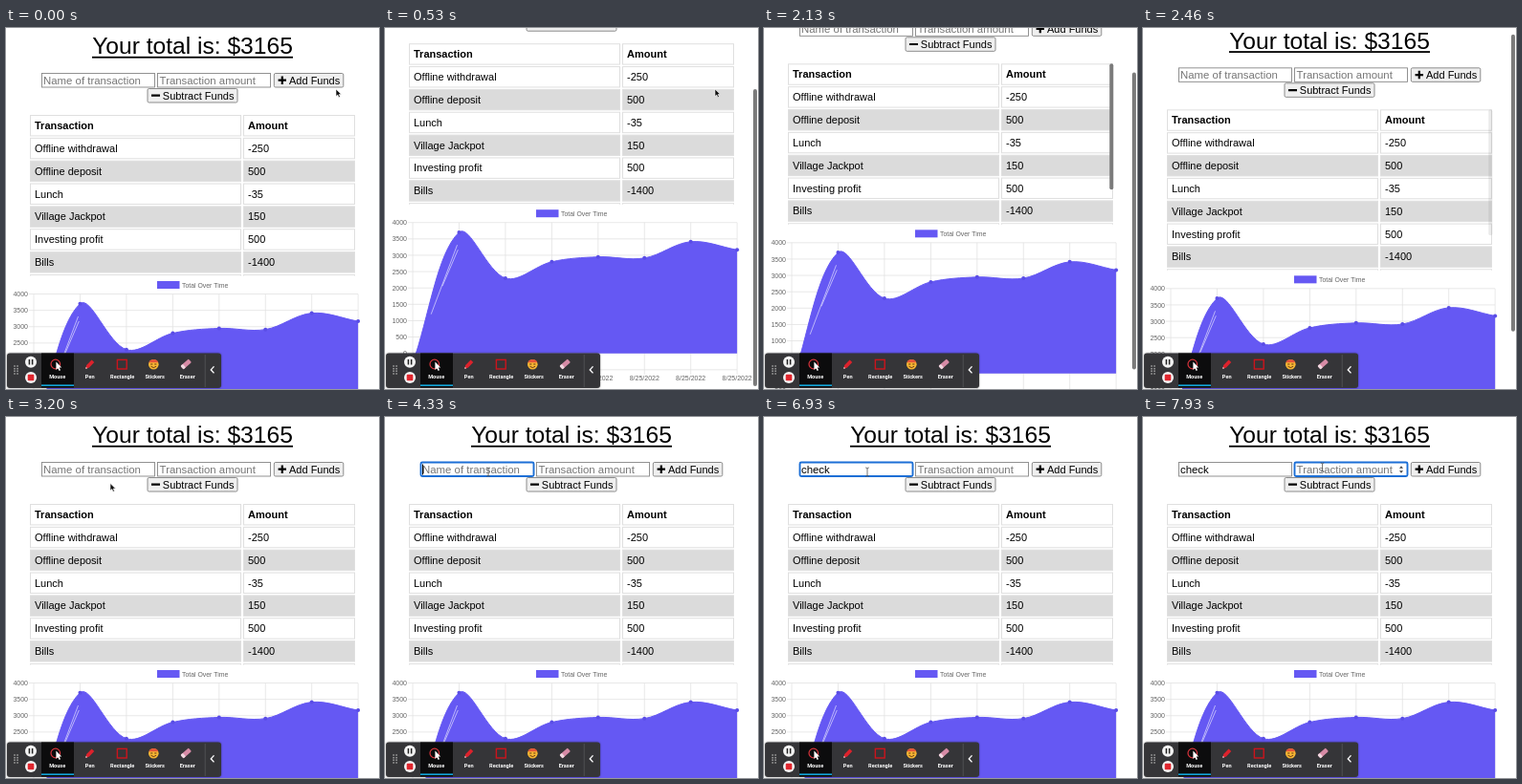
These frames come from a looping animation (390 by 378 pixels, 8 s). An HTML page:

```html
<!DOCTYPE html>
<html lang="en">
<head>
<meta charset="utf-8">
<title>Budget tracker</title>
<style>
html, body { margin: 0; width: 100%; height: 100%; overflow: hidden; background: #fff; }
svg { display: block; width: 390px; height: 378px; }
text { font-family: "Liberation Sans", Arial, sans-serif; white-space: pre; }
text.tool { font: 700 5.6px Roboto, sans-serif; fill: #fff; text-anchor: middle; }
.tick { font-size: 7px; fill: #666; }
.hint { fill: #757575; }
</style>
</head>
<body>
<svg id="stage" viewBox="0 0 390 378" xmlns="http://www.w3.org/2000/svg">
  <defs>
    <clipPath id="tableClip"><rect x="20" y="90.5" width="350" height="169"/></clipPath>
    <filter id="shadow" x="-10%" y="-30%" width="120%" height="160%">
      <feDropShadow dx="0" dy="0" stdDeviation="1.2" flood-color="#000" flood-opacity=".4"/>
    </filter>
  </defs>
  <rect width="390" height="378" fill="#fff"/>
  <g id="page">
    <text x="195" y="27.3" font-size="24.6" text-anchor="middle">Your total is: $3165</text>
    <rect x="90" y="29.8" width="210" height="1.8"/>
    <g font-size="11.4">
      <rect id="nameBox" x="37.5" y="47.5" width="118" height="14.5" fill="#fff"/>
      <text id="nameText" x="39" y="58.8"></text>
      <rect id="amountBox" x="158.5" y="47.5" width="118" height="14.5" fill="#fff"/>
      <text class="hint" x="160.6" y="58.8">Transaction amount</text>
      <path id="spinner" d="M268 53.8l2-2.6 2 2.6zM268 56.2l2 2.6 2-2.6z" fill="#444"/>
      <rect id="caret" y="49.5" width="1" height="11"/>
    </g>
    <g fill="#efefef" stroke="#808080" stroke-width=".9">
      <rect x="280.3" y="47.5" width="72.5" height="14.5" rx="1.5"/>
      <rect x="148" y="63.5" width="94" height="14.5" rx="1.5"/>
    </g>
    <path d="M284.6 54.7h8.4M288.8 50.5v8.4M152 70.7h9" stroke="#000" stroke-width="2.2"/>
    <text x="296" y="58.6" font-size="11">Add Funds</text>
    <text x="163.8" y="74.6" font-size="11">Subtract Funds</text>
    <g clip-path="url(#tableClip)"><g id="table"></g></g>
    <rect id="tableBar" x="361.3" width="4" height="132" rx="2" fill="#7b7b7b"/>
    <g id="chart"></g>
  </g>
  <rect id="pageBar" x="385" width="4" height="311" rx="2" fill="#7b7b7b"/>

  <g id="toolbar">
    <rect x="1" y="340.5" width="224" height="36.5" rx="3" fill="#343537" filter="url(#shadow)"/>
    <rect x="37" y="340.5" width="34" height="36" fill="#0c0c0d"/>
    <rect x="37" y="373.4" width="34" height="1.6" fill="#13a5d8"/>
    <path d="M9 353.2v10M12 353.2v10" stroke="#a5a5a5" stroke-width="1.5" stroke-dasharray="1.5 1.2"/>
    <circle cx="26" cy="349.8" r="6" fill="#f4f4f4"/>
    <path d="M24.4 347v5.6M27.6 347v5.6" stroke="#222" stroke-width="1.5"/>
    <circle cx="26" cy="366" r="6" fill="#f4f4f4"/>
    <rect x="22.7" y="362.7" width="6.6" height="6.6" rx="1" fill="#e0262e"/>
    <circle cx="51.8" cy="352" r="4.8" fill="none" stroke="#d8343c" stroke-width="1.2"/>
    <path d="M52.4 349.6v8.3l1.9-1.7 1.3 2.8 1.4-.7-1.3-2.7h2.5z" fill="#fff"/>
    <path d="M83.2 356.8l1-3.8 5.4-5.6 2.7 2.6-5.5 5.7z" fill="#dc222c"/>
    <path d="M83.2 356.8l.5-1.9 1.5 1.4z" fill="#fff"/>
    <rect x="116.4" y="347.4" width="9.8" height="9.6" fill="none" stroke="#cc141c" stroke-width="1.4"/>
    <circle cx="154.3" cy="352.3" r="5.3" fill="#f7b733"/>
    <path d="M149.4 350.2a5.3 5.3 0 0 1 9.8 0z" fill="#e5533a"/>
    <path d="M151.2 352h2.2M155.2 352h2.2M151.5 354.3q2.8 2.6 5.6 0" fill="none" stroke="#5a2c12" stroke-width=".9"/>
    <g transform="rotate(-42 188.2 352)">
      <rect x="182.6" y="349.6" width="11.2" height="4.8" rx="1" fill="#d78ba6"/>
      <rect x="182.6" y="349.6" width="3.2" height="4.8" rx="1" fill="#efd9e0"/>
    </g>
    <path d="M208.2 342v34" stroke="#57585a" stroke-width=".8"/>
    <path d="M217.5 354.4l-3.2 3.5 3.2 3.5" fill="none" stroke="#fff" stroke-width="1.4"/>
  </g>
  <path id="arrow" d="M0 0v7.6l1.8-1.6 1.2 2.7 1.4-.6-1.2-2.6h2.4z" fill="#111" stroke="#fff" stroke-width=".6"/>
  <path id="beam" d="M-1.8-4.5q1.8 0 1.8 1.3q0-1.3 1.8-1.3M0-3.4v7M-1.8 4.7q1.8 0 1.8-1.3q0 1.3 1.8 1.3" fill="none" stroke="#555" stroke-width=".8"/>
</svg>
<script>
const $ = id => document.getElementById(id);

function add(parent, tag, attrs, text) {
  const el = document.createElementNS("http://www.w3.org/2000/svg", tag);
  for (const k in attrs) el.setAttribute(k, attrs[k]);
  if (text !== undefined) el.textContent = text;
  parent.appendChild(el);
  return el;
}
function set(id, attrs) {
  for (const k in attrs) $(id).setAttribute(k, attrs[k]);
}

const entries = [
  ["Transaction", "Amount"], ["Offline withdrawal", -250], ["Offline deposit", 500],
  ["Lunch", -35], ["Village Jackpot", 150], ["Investing profit", 500],
  ["Bills", -1400], ["Paycheck", 4000], ["Groceries", -300]
];

function buildTable() {
  const g = $("table");
  entries.forEach((row, i) => {
    const y = 91 + i * 23.85;
    const fill = i && i % 2 === 0 ? "#dbdbdb" : "#fff";
    [[25, 221], [248, 117]].forEach(([x, w], c) => {
      add(g, "rect", { x: x + .5, y: y + .5, width: w - 1, height: 21.4, fill, stroke: "#dfdfdf" });
      add(g, "text", {
        x: x + 5, y: y + 15, "font-size": 11, "font-weight": i ? 400 : 700
      }, row[c]);
    });
  });
}

const px = i => 29 + i * 48.45;
const py = v => 415.5 - v * .03425;

// Smooth path through the points, handles scaled by neighbour distance
function spline(p, tension) {
  const handles = p.map((b, i) => {
    const a = p[i - 1] || b, c = p[i + 1] || b;
    const d1 = Math.hypot(b[0] - a[0], b[1] - a[1]);
    const d2 = Math.hypot(c[0] - b[0], c[1] - b[1]);
    const k1 = tension * d1 / (d1 + d2), k2 = tension * d2 / (d1 + d2);
    const dx = c[0] - a[0], dy = c[1] - a[1];
    return [[b[0] - k1 * dx, b[1] - k1 * dy], [b[0] + k2 * dx, b[1] + k2 * dy]];
  });
  return p.slice(1).reduce((d, q, i) =>
    d + ` C${handles[i][1]} ${handles[i + 1][0]} ${q}`, "M" + p[0]);
}

function buildChart() {
  const g = $("chart"), color = "#6558f3";
  add(g, "rect", { x: 158, y: 265, width: 23.5, height: 8, fill: color });
  add(g, "text", { x: 184, y: 271.6, "font-size": 6.9, fill: "#666" }, "Total Over Time");
  for (let v = -500; v <= 4000; v += 500) {
    add(g, "path", { d: `M24 ${py(v)}H368`, stroke: "#e3e3e3", "stroke-width": .8 });
    add(g, "text", { class: "tick", x: 23, y: py(v) + 2.6, "text-anchor": "end" }, v);
  }
  let total = 0;
  const pts = entries.slice(1).reverse().map((row, i) => [px(i), py(total += row[1])]);
  pts.forEach(([x]) => {
    add(g, "path", { d: `M${x} ${py(4000)}V${py(-500) + 5}`, stroke: "#e3e3e3", "stroke-width": .8 });
    add(g, "text", { class: "tick", x, y: 443.6, "text-anchor": "middle" }, "8/25/2022");
  });
  const line = spline(pts, .35);
  add(g, "path", { d: `${line}V${py(0)}H${px(0)}z`, fill: color });
  add(g, "path", { d: line, fill: "none", stroke: color, "stroke-width": 1 });
  pts.forEach(([cx, cy]) => add(g, "circle", { cx, cy, r: 2, fill: "#5a4de6" }));
  add(g, "path", {
    d: "M75.5 302L48.2 374.5M76.3 307L60 345", stroke: "#fff", "stroke-width": .7, opacity: .8
  });
}

function buildTools() {
  ["Mouse", "Pen", "Rectangle", "Stickers", "Eraser"].forEach((name, i) =>
    add($("toolbar"), "text", { class: "tool", x: 53.7 + i * 34, y: 367.4 }, name));
}

const span = (t, a, b) => Math.min(1, Math.max(0, (t - a) / (b - a)));
const out = (u, n) => 1 - Math.pow(1 - u, n);
const smooth = u => u * u * (3 - 2 * u);
const mix = (a, b, u) => a + (b - a) * u;

const keyTimes = [5400, 5600, 5800, 6260, 6400];
const nameFocus = 4200, amountFocus = 7330;

function pointer(t) {
  if (t < 2660) return [345, 64];
  const a = smooth(span(t, 2660, 3060));
  const b = smooth(span(t, 3260, 3900));
  const c = smooth(span(t, 6930, 7300));
  return [mix(mix(345, 109, a) - b, 187.5, c), mix(mix(mix(64, 69.5, a), 57.5, b), 52.5, c)];
}

function box(id, focused) {
  set(id, {
    stroke: focused ? "#1c6fd6" : "#868686",
    "stroke-width": focused ? 1.9 : .9,
    rx: focused ? 1.5 : 0
  });
}

function render(t) {
  const scroll = 77 * (out(span(t, 60, 860), 4) - out(span(t, 2030, 2600), 1.85));
  const inner = 46 * (out(span(t, 930, 1230), 2.4) - out(span(t, 1800, 2060), 2));
  set("page", { transform: `translate(0 ${-scroll})` });
  set("table", { transform: `translate(0 ${-inner})` });
  set("pageBar", {
    y: 2 + scroll * .83,
    opacity: t < 1700 ? span(t, 60, 130) * (1 - span(t, 1100, 1300))
                      : span(t, 2000, 2060) * (1 - span(t, 2760, 3060))
  });
  set("tableBar", {
    y: 91 + inner * .785,
    opacity: span(t, 930, 1000) * (1 - span(t, 2250, 2500))
  });

  const typed = keyTimes.filter(k => t >= k).length;
  const inName = t >= nameFocus && t < amountFocus, inAmount = t >= amountFocus;
  box("nameBox", inName);
  box("amountBox", inAmount);
  const label = $("nameText");
  label.textContent = typed ? "check".slice(0, typed) : "Name of transaction";
  label.setAttribute("class", typed ? "" : "hint");
  set("spinner", { opacity: inAmount ? 1 : 0 });

  const since = inAmount ? amountFocus : typed ? keyTimes[typed - 1] : nameFocus;
  const lit = (inName || inAmount) && Math.floor((t - since) / 530) % 2 === 0;
  set("caret", {
    x: inAmount ? 160.3 : 39 + (typed ? label.getComputedTextLength() : 0),
    opacity: lit ? 1 : 0
  });

  const [x, y] = pointer(t);
  const overInput = t > 3260 && y < 62 && (x < 155 || x > 159);
  const hidden = t >= 930 && t < 2660;
  const at = `translate(${x} ${y})`;
  set("arrow", { transform: at, opacity: hidden || overInput ? 0 : 1 });
  set("beam", { transform: at, opacity: overInput ? 1 : 0 });
}

function frame() {
  render(performance.now() % 8000);
  requestAnimationFrame(frame);
}

buildTable();
buildChart();
buildTools();
frame();
</script>
</body>
</html>
```
